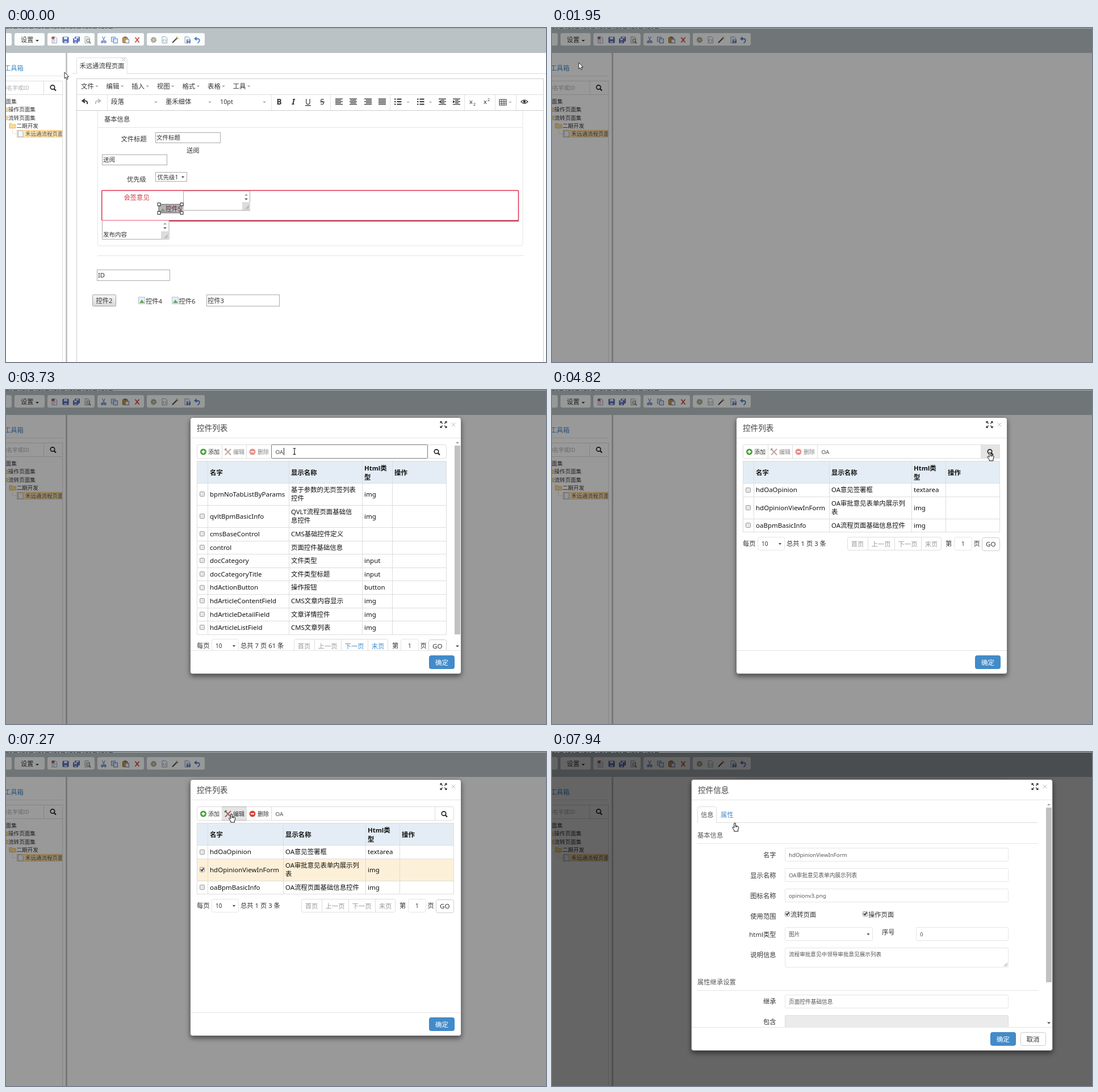
Write an HTML page that moves like this. It is 951 by 589 pixels and loops after 8 s.

```html
<!DOCTYPE html>
<html lang="zh-CN">
<head>
<meta charset="utf-8">
<title>控件列表</title>
<style>
html, body { margin: 0; width: 100%; height: 100%; overflow: hidden; background: #fff; }
svg { display: block; width: 951px; height: 589px; }
text { font-family: "Noto Sans", "Noto Sans CJK SC", "Noto Sans CJK", sans-serif; white-space: pre; }
</style>
</head>
<body>
<svg id="stage" viewBox="0 0 951 589" xmlns="http://www.w3.org/2000/svg"></svg>
<script>
const LOOP = 8000, BLUE = '#428bca', INK = '#333';

// Drawing helpers: y of a text is its vertical centre.
const text = (x, y, s, size = 11.3, fill = INK, extra = '') =>
  `<text x="${x}" y="${y + size * 0.37}" font-size="${size}" fill="${fill}" ${extra}>${s}</text>`;
const rect = (x, y, x2, y2, fill = '#fff', stroke = 'none', r = 0, extra = '') =>
  `<rect x="${x}" y="${y}" width="${x2 - x}" height="${y2 - y}" rx="${r}" fill="${fill}" stroke="${stroke}" ${extra}/>`;
const box = (x, y, x2, y2, stroke = '#ddd', r = 0, fill = '#fff', extra = '') =>
  rect(x + 0.5, y + 0.5, x2 - 0.5, y2 - 0.5, fill, stroke, r, extra);
const path = (d, stroke = INK, w = 1, fill = 'none') =>
  `<path d="${d}" stroke="${stroke}" stroke-width="${w}" fill="${fill}"/>`;
const hline = (x, x2, y, c = '#e5e5e5') => path(`M${x} ${Math.round(y) + 0.5}H${x2}`, c);
const vline = (x, y, y2, c = '#ddd') => path(`M${Math.round(x) + 0.5} ${y}V${y2}`, c);
const caret = (x, y, w = 3, c = '#aaa') => path(`M${x - w} ${y - w / 2}h${2 * w}l${-w} ${w}z`, 'none', 0, c);
const caretUp = (x, y, w = 3, c = '#999') => path(`M${x - w} ${y + w / 2}h${2 * w}l${-w} ${-w}z`, 'none', 0, c);
const at = (x, y, body) => `<g transform="translate(${x} ${y})">${body}</g>`;
const group = (id, body, extra = '') => `<g id="${id}" ${extra}>${body}</g>`;
const lens = (x, y) => at(x, y, `<circle cx="-1" cy="-1" r="3.7" fill="none" stroke="#222" stroke-width="1.7"/>` + path('M1.7 1.7L5 5', '#222', 2.2));
const check = (x, y, on) => box(x - 4.5, Math.round(y - 4.5), x + 4.5, Math.round(y + 4.5), '#999', 1, '#e6e6e6') +
  (on ? path(`M${x - 2.5} ${y}l2 2.2l3.3 -4.5`, '#222', 1.6) : '');
const grip = (x, y) => path(`M${x - 6} ${y}L${x} ${y - 6}M${x - 3} ${y}L${x} ${y - 3}`, '#888');
const cross = (x, y, r, c, w = 1) => path(`M${x - r} ${y - r}l${2 * r} ${2 * r}m0 ${-2 * r}l${-2 * r} ${2 * r}`, c, w);

// Small toolbar icons, centred on 0,0.
const page = (fill = '#fff') => path('M-4 -5.5H2L4.5 -3V5.5H-4Z', '#93a6c0', 1, fill);
const floppy = rect(-5, -5, 5, 5, '#5a70c4', '#4256a6', 1) + rect(-3, -5, 3, -1, '#dce6fa') + rect(-2.5, 2, 2.5, 5, '#c4cfe8');
const lines = path('M-2.5 -1H2.5M-2.5 1.2H2.5M-2.5 3.4H1', '#8fb2dc');
const icons = {
  85: page() + lines + path('M-5 -3.5H1M-2 -6V-1', '#c8423e', 2.2),
  105: floppy,
  124: at(1.5, -1.5, `<g transform="scale(.8)">${floppy}</g>`) + at(-1.5, 1.5, `<g transform="scale(.8)">${floppy}</g>`),
  143: page('#eef4e4') + '<circle cx="1.5" cy="1" r="2.8" fill="#d8e8f4" stroke="#777"/>' + path('M3.5 3L6 6', '#8a6a3a', 1.8),
  172: path('M-2.5 -6L1.5 2M2.5 -6L-1.5 2', '#7d99c4', 1.3) + '<circle cx="-2.5" cy="3.5" r="1.6" fill="none" stroke="#3c66b8" stroke-width="1.3"/><circle cx="2.5" cy="3.5" r="1.6" fill="none" stroke="#3c66b8" stroke-width="1.3"/>',
  191: rect(-5.5, -5, 1.5, 3, '#cfe0f6', '#6f98cc') + rect(-1.5, -2, 5.5, 5.5, '#e4eefb', '#5a88c4'),
  211: rect(-5.5, -4.5, 3, 5, '#c9994a', '#8a6428', 1) + rect(-3, -6, 1, -3.5, '#777') + rect(-1, -1, 5.5, 5.5, '#eef3fb', '#6a7fa6'),
  231: path('M-3.5 -4.5L3.5 4.5M3.5 -4.5L-3.5 4.5', '#cf4a42', 1.8),
  260: '<circle r="4" fill="#c9c6b2" stroke="#9a9784" stroke-width="2.4" stroke-dasharray="2 1"/><circle r="1.8" fill="#fff" stroke="#9a9784"/>',
  279: page() + path('M-1 -1.5L-2.7 1L-1 3.5M1 -1.5L2.7 1L1 3.5', '#6ba578'),
  298: path('M-5 5L3 -3', '#444', 2) + path('M2 -5.5L5.5 -2', '#d8b040', 1.8),
  319: page('#eaf1fb') + at(2.5, 2.5, `<g transform="scale(.6)">${floppy}</g>`),
  337: path('M-1.5 -5L-4.5 -2L-1 .5M-4 -2H1Q4.5 -1.5 3.5 2Q3 4 .5 5.5', '#4f80c8', 1.8),
};

function basePage() {
  const folder = (x, y) => path(`M${x} ${y - 4}h4l1.5 1.5h5.5v6.5h-11z`, '#dfba68', 1, '#f8de96');
  const pills = [[-6, 10], [15, 68], [73, 156], [161, 243], [248, 350]];
  return rect(0, 0, 951, 589) + rect(0, 0, 951, 44, '#bac2c5') +
    pills.map(([a, b]) => rect(a, 9, b, 31, '#fbfcfc', 'none', 3)).join('') +
    group('setBtn', box(14, 8, 69, 32, '#a6a9aa', 3, '#d6d8d9')) +
    text(26, 21, '设置', 11.2) + caret(55, 22.5, 3, INK) +
    Object.entries(icons).map(([x, body]) => at(x, 21, body)).join('') +
    text(-3, 70.5, '工具箱', 11.3, BLUE) + hline(0, 100, 84) +
    box(-5, 93, 100, 118, '#ddd') + vline(66, 93, 117) + text(-8, 105, '的名字或ID', 9.6, '#aaa') + lens(83, 105.5) +
    vline(99, 118, 589) + rect(105, 44, 108, 589, '#c6c6c6') +
    text(-10, 129, '页面集', 9.6) + folder(-8, 143.5) + text(4, 143.5, '操作页面集', 9.6) +
    folder(-8, 158) + text(4, 158, '流转页面集', 9.6) + folder(6, 172.5) + text(18.5, 172.5, '二期开发', 9.6) +
    '<path d="M11.5 178V186.5H18" fill="none" stroke="#ccc" stroke-dasharray="1 1"/>' +
    '<g clip-path="url(#side)" opacity=".85">' + box(19, 180, 104, 193, '#ffb951', 0, '#ffe6b0') +
    at(25.5, 186.5, page('#f2f7ff')) + text(34, 186.5, '禾远通流程页面', 9.5) + '</g>';
}

// Lower edge of the window above the page; never shaded.
const windowEdge = () => rect(0, 0, 951, 1, '#a6adb0') +
  '<path d="M0 .5H190" stroke="#4c5357" stroke-dasharray="5 2 3 3 7 4 2 2"/>';

function editorBar() {
  const bars = (x, shift) => [10, 7, 10, 7, 10].map((w, i) =>
    path(`M${x - 6 + (i % 2 ? shift : 0)} ${125 + i * 2.4}h${w + 3}`, INK, 1.3)).join('');
  const list = x => [0, 1, 2].map(i => path(`M${x - 6} ${125.5 + i * 4.5}h2.5m2 0h8`, INK, 1.8)).join('');
  const dent = (x, d) => bars(x, 0) + rect(x - 7, 126.5, x - 2, 133.5) + path(`M${x - 4 + d * 2} 127.5l${-d * 4} 2.5l${d * 4} 2.5z`, 'none', 0, INK);
  const glyph = (x, s, extra) => text(x, 130, s, 13.5, INK, 'text-anchor="middle" ' + extra);
  return ['文件', '编辑', '插入', '视图', '格式', '表格', '工具'].map((s, i) =>
      text(132 + i * 44.6, 102.5, s, 11.4) + caret(160 + i * 44.6, 103, 2.8)).join('') +
    hline(124, 947, 117, '#ddd') + hline(124, 947, 145, '#ccc') +
    [178, 467, 571, 676, 807, 861, 898].map(x => vline(x, 118, 145, '#e2e2e2')).join('') +
    path('M139 125L134.5 128.5L139 132M135 128.5H140Q144 129 143 134', INK, 2) +
    path('M162 125L166.5 128.5L162 132M166 128.5H161Q157 129 158 134', '#bbb', 2) +
    text(185, 130, '段落', 11.4) + caret(264, 131, 2.8) + text(281, 130, '墨禾细体', 11.3) + caret(359, 131, 2.8) +
    text(377, 130, '10pt', 10.8) + caret(455, 131, 2.8) +
    glyph(481, 'B', 'font-weight="700"') + glyph(506, 'I', 'font-style="italic" font-weight="600"') +
    glyph(532, 'U', 'text-decoration="underline"') + glyph(557, 'S', 'text-decoration="line-through"') +
    bars(586, 0) + bars(611, 1.5) + bars(637, 3) +
    [0, 1, 2, 3, 4].map(i => path(`M656 ${125 + i * 2.4}h13`, INK, 1.3)).join('') +
    list(690) + caret(708, 131, 2.6) + list(730) + caret(747.5, 131, 2.6) + dent(768, 1) + dent(793, -1) +
    text(816, 130, 'x', 11) + text(823, 134, '2', 7) + text(841, 130, 'x', 11) + text(848, 126, '2', 7) +
    rect(869, 126, 881, 136, '#fff', INK) + path('M869 129.5H881M869 132.8H881M873 126V136M877 126V136', INK, 0.9) + caret(888, 131, 2.6) +
    path('M907 130Q913 123.5 919 130Q913 136 907 130Z', INK, 1.2) + '<circle cx="913" cy="129.8" r="2.3" fill="#333"/>';
}

function editor() {
  const field = (x, y, x2, y2, s, size = 10.5) => box(x, y, x2, y2, '#aaa') + text(x + 2, (y + y2) / 2, s, size);
  const broken = x => box(x, 474, x + 12, 487, '#b9c4cf', 0, '#e3eef8') + path(`M${x + 2} 485l4 -6l5 6z`, 'none', 0, '#6ba55b');
  const spin = (x, y) => caretUp(x, y) + caret(x, y + 8, 3, '#555');
  const corner = (x, y) => rect(x - 14, y - 14, x, y, '#dcdcdc') + grip(x - 2, y - 2);
  const knob = (x, y) => rect(x - 2.5, y - 2.5, x + 2.5, y + 2.5, '#fff', '#222');
  return hline(117, 951, 80, '#ddd') + path('M124.5 81V55.5q0 -3 3 -3H210q3 0 3 3V81', '#ddd', 1, '#fff') +
    text(129.5, 66.5, '禾远通流程页面', 11.3) + cross(207, 55.5, 3.5, '#bbb') +
    box(124, 89, 947, 600, '#ccc') + editorBar() +
    path('M161.5 146V381q0 3 3 3H907q3 0 3 -3V146', '#e5e5e5') + hline(161, 910, 175) + text(173, 161, '基本信息') +
    text(202.5, 196, '文件标题') + field(263, 184, 378, 203, '文件标题') + text(318, 216, '送阅') +
    field(169, 223, 284, 242, '送阅') + text(213, 266.5, '优先级') +
    box(263, 254, 319, 271, '#aaa') + text(266.5, 263, '优先级1', 10.3) + caret(311.5, 263, 2.6, '#222') +
    path('M287 340.5H903', '#56635c', 1.4) + rect(168.7, 286.6, 902.5, 339.4, '#fff', '#e0304f', 1.5, 'stroke-width="1.5"') +
    text(207.5, 299, '会签意见', 11.3, '#cf3a45') +
    path('M312.5 287.5V321.5H430M429.5 287V321', '#aaa') + path('M313 287.5H430', '#bbb', 1) + spin(423, 294) + corner(430, 321) +
    rect(269, 311, 310, 326, '#b4b4b8', '#555') + path('M272 324l4 -6l5 6z', 'none', 0, '#7d9a78') + text(281, 319, '控件5', 10.8, '#5c2430') +
    knob(269.5, 311) + knob(309.5, 311) + knob(269.5, 326) + knob(309.5, 326) +
    path('M169.5 340V372.5H287V340', '#aaa', 1, '#fff') + path('M169 339.5H287', '#e9889a', 1) +
    text(171, 364, '发布内容', 10.5) + spin(280, 345) + corner(287, 372.5) +
    hline(161, 911, 401) + field(160, 426, 289, 446, 'ID', 11.3) +
    box(152, 470, 194, 491, '#a5a5a5', 1, 'url(#btn)') + text(158.5, 480.5, '控件2') +
    broken(233) + text(246, 481.5, '控件4') + broken(292) + text(304.5, 481.5, '控件6') + field(353, 470, 482, 491, '控件3', 11.3);
}

const menu = () => rect(13, 39, 158, 194, '#000', 'none', 4, 'opacity=".1"') +
  path('M22 41L28 35.5L34 41Z', 'none', 0, '#fafafa') + rect(15, 41, 155, 190.5, '#fff', 'none', 2) +
  group('menuHot', rect(15, 41, 155, 67.5, '#f4f4f4')) +
  ['控件', '工具箱', '导入控件', '导出控件', '页面模板'].map((s, i) =>
    text(26.5, 55 + i * 26.7 + (i > 3 ? 15.5 : 0), s, 11.3, '#555')).join('');

function shell(x, x2, y2, title, foot) {
  const ex = x2 - 31.5, arrow = path('M1.8 1.8L5 5', INK, 1.5) + path('M6 2V6H2Z', 'none', 0, INK);
  return box(x, 48, x2, y2 + 1, '#777', 4, '#fff', 'filter="url(#drop)"') + text(x + 12, 67, title, 13.6, '#444') +
    hline(x + 1, x2 - 1, 84) + hline(x + 1, x2 - 1, foot) + cross(x2 - 14, 61, 3.3, '#bbb') +
    at(ex, 61, [0, 90, 180, 270].map(a => `<g transform="rotate(${a})">${arrow}</g>`).join(''));
}
const scroller = (x, y2, end) => rect(x - 5, 98, x + 5, y2, '#c1c1c1') + caretUp(x, 92.5, 3) + caret(x, end, 3, '#444');
const okButton = (x, y) => box(x, y, x + 45, y + 24, '#3d85c4', 3, BLUE) + text(x + 22.5, y + 13, '确定', 11.5, '#fff', 'text-anchor="middle"');

function toolButtons() {
  const label = (x, s) => text(x, 109, s, 10.1);
  const disc = (x, c) => `<circle cx="${x}" cy="109" r="5.5" fill="${c}"/>` + path(`M${x - 3} 109h6`, '#fff', 2);
  return box(336, 96, 468, 121, '#ddd', 2) + group('editHot', box(380, 96, 424, 121, '#b5b5b5', 0, '#e4e4e4')) +
    vline(380, 97, 120) + vline(423, 97, 120) + disc(347.5, '#4a9e3f') + path('M347.5 106V112', '#fff', 2) + label(356, '添加') +
    group('rowTools', path('M386 104L396 114.5', '#777', 2) + path('M396 104L386 114.5', '#c2614c', 2) +
      path('M385 106l3 -3', '#555', 2) + label(400, '编辑') + disc(434, '#d9473d') + label(443, '删除'));
}

function grid(id, right, cols, rows, pagerY, summary, linkColor) {
  const btn = right - 34, dx = right - 776;
  let y = 164.3, out = box(467, 96, btn + 1, 121, '#ddd') + box(btn, 96, right, 121, '#ddd', 2) +
    group('hot' + id, box(btn, 96, right, 121, '#ddd', 0, '#e4e4e4')) + lens(btn + 17, 109.5) +
    rect(336, 125, right, 164, '#e4edf5');
  const bold = 'font-weight="700"', cell = c => cols[c] + 4;
  out += [['名字', 1], ['显示名称', 2], ['操作', 4]].map(([s, c]) => text(cell(c), 145.5, s, 11.4, '#111', bold)).join('') +
    text(cell(3), 138, 'Html类', 11.4, '#111', bold) + text(cell(3), 153.5, '型', 11.4, '#111', bold) + hline(336, right, 125, '#ddd');
  for (const [name, label, type, picked] of rows) {
    const parts = label.split('|'), h = parts.length > 1 ? 38.8 : 23.6, mid = y + h / 2;
    if (picked) out += group('pick', rect(336, Math.round(y), right, Math.round(y + h), '#fdf0d8') + check(345.5, mid, true));
    out += hline(336, right, y, '#ddd') + (picked ? group('unpick', check(345.5, mid)) : check(345.5, mid)) +
      text(cell(1), mid, name, 11.5, '#111') + text(cell(3), mid, type, 11.5, '#111') +
      parts.map((s, i) => text(cell(2), mid + (i - (parts.length - 1) / 2) * 15, s, 11.4, '#111')).join('');
    y += h;
  }
  out += hline(336, right, y, '#ddd') + [...cols, right - 1].map(x => vline(x, 125, y)).join('');
  const p = pagerY, tabs = [507, 543, 590, 637, 673].map(x => x + dx);
  const names = ['首页', '上一页', '下一页', '末页'];
  return group(id, out + text(336, p, '每页') + box(362, p - 12, 410, p + 12, '#e5e5e5', 3) + text(369, p + 0.5, '10', 10) +
    caret(401.5, p + 0.5, 2.6, '#222') + text(413, p, summary) + box(tabs[0], p - 12, tabs[4], p + 12, '#ddd', 3) +
    names.map((s, i) => (i ? vline(tabs[i], p - 12, p + 12) : '') +
      text((tabs[i] + tabs[i + 1]) / 2, p + 0.5, s, 11.3, i > 1 ? linkColor : '#999', 'text-anchor="middle"')).join('') +
    text(680 + dx, p, '第') + box(695 + dx, p - 12, 727 + dx, p + 12, '#e5e5e5', 3) + text(708 + dx, p + 0.5, '1', 10) +
    text(729.5 + dx, p, '页') + box(744 + dx, p - 11, 776 + dx, p + 13, '#ccc', 3) + text(751 + dx, p + 1, 'GO', 11.6), 'clip-path="url(#listBody)"');
}

function listDialog() {
  const all = [
    ['bpmNoTabListByParams', '基于参数的无页签列表|控件', 'img'],
    ['qvltBpmBasicInfo', 'QVLT流程页面基础信|息控件', 'img'],
    ['cmsBaseControl', 'CMS基础控件定义', ''], ['control', '页面控件基础信息', ''],
    ['docCategory', '文件类型', 'input'], ['docCategoryTitle', '文件类型标题', 'input'],
    ['hdActionButton', '操作按钮', 'button'], ['hdArticleContentField', 'CMS文章内容显示', 'img'],
    ['hdArticleDetailField', '文章详情控件', 'img'], ['hdArticleListField', 'CMS文章列表', 'img']];
  const found = [
    ['hdOaOpinion', 'OA意见签署框', 'textarea'],
    ['hdOpinionViewInForm', 'OA审批意见表单内展示列|表', 'img', true],
    ['oaBpmBasicInfo', 'OA流程页面基础信息控件', 'img']];
  return shell(324, 802, 500, '控件列表', 459) + okButton(745, 468) +
    grid('full', 776, [336, 355, 498, 627, 680], all, 451, '总共 7 页 61 条', BLUE) +
    group('bar', scroller(795, 431, 452)) +
    grid('hits', 789, [336, 355, 488, 633, 693], found, 271, '总共 1 页 3 条', '#999') + toolButtons() +
    group('focus', box(467, 96, 743, 121, '#777', 1)) +
    '<text id="query" x="474.5" y="112.5" font-size="9.8" fill="#444"></text>' + group('beam', vline(0, 102, 115, '#222'));
}

function infoDialog() {
  const label = (y, s) => text(394.5, y, s, 11.3, INK, 'text-anchor="end"');
  const field = (y, s, x = 410, x2 = 804) => box(x, y - 12, x2, y + 12, '#e5e5e5', 2) + text(x + 7, y + 0.5, s, 9.7, '#555');
  const heading = (y, s) => text(256, y, s, 11.3, '#555') + hline(256, 856, y + 14);
  const body = hline(256, 856, 124, '#ddd') + path('M256.5 125V99.5q0 -3 3 -3H286.5q3 0 3 3V125', '#ddd', 1, '#fff') +
    text(262, 111, '信息', 11.3, '#555') + text(297, 111, '属性', 11.3, BLUE) + heading(147, '基本信息') +
    label(182, '名字') + field(181, 'hdOpinionViewInForm') + label(217.5, '显示名称') + field(217, 'OA审批意见表单内展示列表') +
    label(253.5, '图标名称') + field(253, 'opinionv3.png') + label(289.5, '使用范围') +
    check(414.5, 285, true) + text(420, 286.5, '流转页面') + check(551.5, 285, true) + text(557, 286.5, '操作页面') +
    label(321.5, 'html类型') + field(321, '图片', 410, 565) + caret(557, 321.5, 2.6, '#222') +
    text(581, 317.5, '序号') + field(321, '0', 641, 804) + label(357.5, '说明信息') +
    box(410, 345, 804, 380, '#e5e5e5', 2) + text(417, 356, '流程审批意见中领导审批意见展示列表', 9.6, '#555') + grip(802, 378) +
    heading(406, '属性继承设置') + label(440, '继承') + field(440, '页面控件基础信息') +
    label(476, '包含') + box(410, 464, 804, 495, '#ddd', 2, '#ebebeb');
  return shell(245, 882, 526, '控件信息', 485) + `<g clip-path="url(#infoBody)">${body}</g>` + scroller(875, 406, 478) +
    okButton(772, 494) + box(825, 494, 870, 518, '#ccc', 3) + text(847, 507, '取消', 11.5, INK, 'text-anchor="middle"');
}

const cursors = {
  arrow: path('M0 0V11L2.5 8.8L4.2 12.6L6.1 11.7L4.4 8H7.8Z', '#111', 0.9, '#fff'),
  hand: path('M-1.3 .8Q0 -.6 1.3 .8V5L5.3 6Q7 6.5 6.8 8.2L5.6 12V15H-1.2V13L-4.4 8.6Q-4.4 6.8 -2.8 7.4L-1.3 8.8ZM1.3 5V7.5M3.4 5.6V8', '#111', 1, '#fff'),
  ibeam: path('M-2.5 -5H-.8L0 -4.3L.8 -5H2.5M-2.5 5.5H-.8L0 4.8L.8 5.5H2.5M0 -4.3V4.8', '#111', 1.1),
};
const clip = (id, x, y, x2, y2) => `<clipPath id="${id}">${rect(x, y, x2, y2)}</clipPath>`;

document.getElementById('stage').innerHTML = '<defs>' + clip('side', 0, 44, 99, 589) + clip('listBody', 324, 85, 802, 459) +
  clip('infoBody', 245, 85, 869, 485) +
  '<linearGradient id="btn" x2="0" y2="1"><stop stop-color="#f6f6f6"/><stop offset="1" stop-color="#d8d8d8"/></linearGradient>' +
  '<filter id="drop" x="-10%" y="-10%" width="120%" height="120%"><feDropShadow dx="0" dy="4" stdDeviation="4.5" flood-opacity=".5"/></filter></defs>' +
  basePage() + group('editor', editor()) + group('menu', menu()) + group('shade1', rect(0, 0, 951, 589, '#000')) +
  group('list', listDialog()) + group('shade2', rect(0, 0, 951, 589, '#000')) + group('info', infoDialog()) + windowEdge() +
  group('cursor', Object.keys(cursors).map(k => group(k, cursors[k])).join(''));

const el = id => document.getElementById(id);
const show = (id, on) => el(id).setAttribute('display', on ? 'inline' : 'none');
const ramp = (t, a, b) => Math.min(1, Math.max(0, (t - a) / (b - a)));

// Bursts of change: first step, last step, number of steps.
const bursts = [[150, 840, 6], [1120, 1400, 3], [1680, 1950, 3], [2110, 2620, 5], [3170, 3170, 1], [3580, 3730, 2],
  [4250, 5210, 8], [5360, 5780, 4], [6050, 7000, 8], [7150, 7270, 2], [7400, 7940, 5]];
function snap(t) {
  let s = 0;
  for (const [a, b, n] of bursts) {
    if (t < a) break;
    const step = n > 1 ? (b - a) / (n - 1) : 1;
    s = Math.min(b, a + Math.floor((t - a) / step + 1e-6) * step);
  }
  return s;
}

// Pointer route: time, x, y, shape from there on.
const route = [[0, 103, 78, 'arrow'], [560, 36, 24, 'hand'], [840, 30, 21, 'hand'], [1400, 39, 60, 'hand'], [1680, 40, 60, 'hand'],
  [1950, 47, 61, 'arrow'], [2480, 512, 108, 'ibeam'], [2620, 508, 108, 'ibeam'], [4110, 508, 108, 'ibeam'],
  [4520, 766, 107, 'hand'], [4790, 768, 108, 'hand'], [4930, 822, 138, 'arrow'], [5210, 749, 109, 'ibeam'],
  [5360, 680, 132, 'arrow'], [5500, 571, 162, 'arrow'], [5780, 447, 176, 'arrow'], [5910, 447, 176, 'arrow'],
  [6320, 346, 205, 'arrow'], [6590, 346, 205, 'arrow'], [7000, 385, 128, 'arrow'], [7150, 394, 112, 'hand'],
  [7270, 397, 109, 'hand'], [7400, 397, 109, 'hand'], [7940, 322, 125, 'hand']];
function pointer(s) {
  let i = 0;
  while (i < route.length - 1 && route[i + 1][0] <= s) i++;
  const a = route[i], b = route[Math.min(i + 1, route.length - 1)], k = ramp(s, a[0], b[0] + (a === b));
  return { x: a[1] + (b[1] - a[1]) * k, y: a[2] + (b[2] - a[2]) * k, shape: a[3] };
}
function drop(id, k) {
  show(id, k > 0);
  el(id).setAttribute('opacity', k);
  el(id).setAttribute('transform', `translate(0 ${-110 * (1 - k) ** 2})`);
}

function draw(t) {
  const s = snap(t), p = pointer(s), searched = s >= 4650, picked = s >= 6450;
  show('setBtn', s >= 560 && s < 1680);
  show('menu', s >= 690 && s < 1680);
  show('menuHot', p.y > 41);
  show('editor', s < 1680);
  el('shade1').setAttribute('opacity', 0.4 * ramp(s, 1610, 1940));
  el('shade2').setAttribute('opacity', 0.34 * ramp(s, 7340, 7700));
  drop('list', ramp(s, 2010, 2360));
  drop('info', ramp(s, 7450, 7800));
  show('full', !searched);
  show('bar', !searched);
  show('hits', searched);
  show('hotfull', s >= 4500);
  show('hothits', !picked);
  show('focus', s >= 2620 && s < 4500);
  const query = s < 3580 ? '' : s < 3730 ? 'O' : 'OA';
  el('query').textContent = query;
  show('beam', s >= 2620 && s < 4500 && s !== 3170);
  el('beam').setAttribute('transform', `translate(${475 + query.length * 7} 0)`);
  show('pick', picked);
  show('unpick', !picked);
  el('rowTools').setAttribute('opacity', picked ? 1 : 0.6);
  show('editHot', s >= 7150);
  el('cursor').setAttribute('transform', `translate(${p.x} ${p.y})`);
  for (const k in cursors) show(k, k === p.shape);
}

function tick() {
  draw(performance.now() % LOOP);
  requestAnimationFrame(tick);
}
tick();
</script>
</body>
</html>
```
